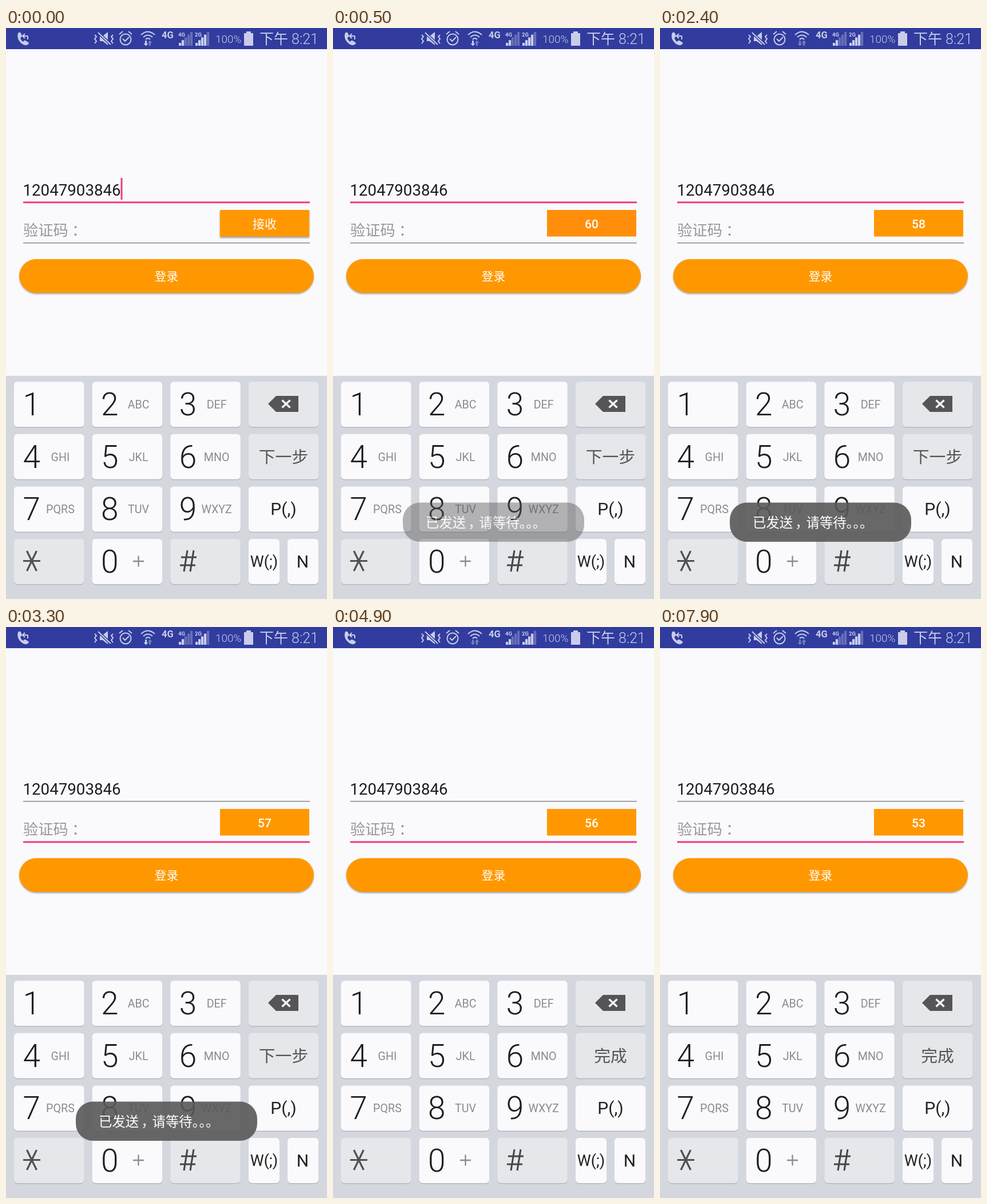
An HTML page for the animation above (8 s loop, 561 px wide and 998 px high).

```html
<!DOCTYPE html>
<html lang="zh-CN">
<head>
<meta charset="utf-8">
<title>登录</title>
<style>
  html, body { margin: 0; width: 100%; height: 100%; overflow: hidden; background: #faf9fc; }
  svg { display: block; width: 100%; height: 100%; font-family: Roboto, "Noto Sans CJK SC", "Noto Sans CJK", sans-serif; }
  .mid { text-anchor: middle; }
  .digit { font-size: 55px; font-weight: 300; fill: #1e1e20; }
  .sub { font-size: 19.7px; fill: #8b8b8f; text-anchor: middle; }
  .label { font-size: 30px; fill: #222; text-anchor: middle; }
  .line { fill: none; stroke: #c9cdea; stroke-width: 2; }
</style>
</head>
<body>
<svg viewBox="0 0 561 998" xmlns="http://www.w3.org/2000/svg">
  <defs>
    <filter id="soft" x="-10%" y="-30%" width="120%" height="170%"><feGaussianBlur stdDeviation="1.5"/></filter>
  </defs>
  <rect width="561" height="998" fill="#faf9fc"/>

  <g id="status" fill="#c9cdea">
    <rect width="561" height="37" fill="#313c9e"/>
    <path d="M21 9 q3 -3 5 0 l2 5 q0 2 -3 3 q1 5 5 7 q2 -3 4 -2 l5 3 q2 2 -1 4 q-5 3 -11 -2 q-9 -8 -6 -18z"/>
    <path class="line" d="M38 14 H30 M33 10 L29 14 L33 18 M38 14 V20"/>
    <path class="line" d="M155 12 l3 3 -3 4 3 4 -3 4 M187 12 l-3 3 3 4 -3 4 3 4" stroke-width="1.6"/>
    <path d="M164 14 h5 l9 -7 v23 l-9 -7 h-5z"/>
    <path d="M161 8 L183 29" stroke="#313c9e" stroke-width="5"/>
    <path class="line" d="M161 8 L183 29"/>
    <circle class="line" cx="209" cy="20" r="9.5"/>
    <path class="line" d="M204 19 l4 4 7 -7 M198 11 l6 -5 M220 11 l-6 -5" stroke-width="2.4"/>
    <path class="line" d="M236 12 Q248 1 260 12 M240 16 Q248 9 256 16 M244 20 Q248 16 252 20" stroke-width="2.6"/>
    <path id="down" d="M243 22 h3 v5 h2.500 l-4 4.500 -4 -4.500 h2.500z"/>
    <path d="M250 31 h3 v-5 h2.500 l-4 -4.500 -4 4.500 h2.500z" opacity=".45"/>
    <text x="272" y="18" font-size="16.500" font-weight="700">4G</text>
    <text x="301" y="15" font-size="9.500" font-weight="700">4G</text>
    <text x="330" y="15" font-size="9.500" font-weight="700">2G</text>
    <g id="bars"></g>
    <text x="366" y="26" font-size="19" font-weight="300">100%</text>
    <path d="M420 6 h8 v3 h4 v22 h-16 v-22 h4z"/>
    <text x="443" y="28" font-size="25" font-weight="300">下午 8:21</text>
  </g>

  <text x="29.500" y="293" font-size="27.700" fill="#1c1c1e">12047903846</text>
  <rect id="phoneLine" x="30" width="501"/>
  <rect id="phoneCaret" x="200.500" y="262" width="3" height="38" fill="#f43a7c"/>
  <text x="30" y="363" font-size="26.300" fill="#98979b">验证码<tspan x="115">：</tspan></text>
  <rect id="codeLine" x="30" width="501"/>
  <rect id="codeCaret" x="29.800" y="333" width="3" height="38" fill="#f43a7c"/>

  <rect id="sendShadow" x="374" y="320" width="156" height="47" fill="#000" opacity=".35" filter="url(#soft)"/>
  <rect id="send" x="374" y="318" width="156" height="46.500"/>
  <text id="sendText" class="mid" x="452" y="349.500" font-size="21" font-weight="500" fill="#fff"></text>

  <rect x="23.500" y="406" width="514" height="59" rx="29.500" fill="#000" opacity=".35" filter="url(#soft)"/>
  <rect x="23" y="404" width="515" height="59" rx="29.500" fill="#ff9800"/>
  <text class="mid" x="280.500" y="441.500" font-size="20.700" fill="#fff">登录</text>

  <rect y="608" width="561" height="390" fill="#d4d7dd"/>
  <g id="keys"></g>
  <path d="M458 657 L472 643 H511 V671 H472Z" fill="#555557"/>
  <path d="M482.500 650.500 l14 13 m0 -13 l-14 13" stroke="#f4f4f6" stroke-width="3.500"/>
  <text id="action" class="mid" x="485" y="760" font-size="28.800" fill="#555557"></text>
  <text class="label" x="485" y="851">P(,)</text>
  <text class="label" x="451" y="942" style="font-size:27px">W(;)</text>
  <text class="label" x="518.500" y="943">N</text>
  <path d="M222 932 h19 m-9.500 -9.500 v19" stroke="#8b8b8f" stroke-width="2.300"/>
  <path d="M30 931.500 h30 M36.500 914 l17 35 m0 -35 l-17 35" stroke="#505052" stroke-width="3.200"/>
  <path d="M317 913 l-6 37 m17 -37 l-6 37 M306 925 h27 M304 939 h27" stroke="#454547" stroke-width="3"/>

  <g id="toast">
    <rect x="122" y="829.500" width="317" height="68.500" rx="30" fill="#595959" opacity=".9"/>
    <text x="162" y="873" font-size="23.400" fill="#fff">已发送<tspan dx="4">，</tspan><tspan dx="-4">请等待。。。</tspan></text>
  </g>
</svg>
<script>
const LOOP = 8000, FOCUS = 3300, TICK = 100;
const PINK = '#f43a7c', GREY = '#77777a';
const $ = id => document.getElementById(id);
const set = (el, attrs) => { for (const k in attrs) el.setAttribute(k, attrs[k]); };
const show = (id, on) => $(id).setAttribute('visibility', on ? 'visible' : 'hidden');
const clamp = v => Math.max(0, Math.min(1, v));

function add(parent, tag, attrs, text) {
  const el = document.createElementNS('http://www.w3.org/2000/svg', tag);
  set(el, attrs);
  if (text) el.textContent = text;
  parent.appendChild(el);
}

function key(x, y, width, special) {
  const box = { x, width, height: 79, rx: 6 };
  add($('keys'), 'rect', { ...box, y: y + 1.5, fill: '#b5b8bf' });
  add($('keys'), 'rect', { ...box, y, fill: special ? '#e5e7eb' : '#faf9fc' });
}

function buildKeys() {
  const letters = ['', 'ABC', 'DEF', 'GHI', 'JKL', 'MNO', 'PQRS', 'TUV', 'WXYZ'];
  for (let row = 0; row < 4; row++) {
    const y = 618.2 + row * 91.6;
    for (let col = 0; col < 3; col++) {
      const x = 14 + col * 136.6, n = row * 3 + col;
      key(x, y, 122.6, row === 3 && col !== 1);
      if (row === 3 && col !== 1) continue;
      add($('keys'), 'text', { class: 'digit', x: x + 15.5, y: y + 59 }, row === 3 ? '0' : String(n + 1));
      if (letters[n]) add($('keys'), 'text', { class: 'sub', x: x + 81, y: y + 46.8 }, letters[n]);
    }
    if (row < 3) key(424, y, 122.5, row < 2);
    else { key(424, y, 54, false); key(492, y, 54, false); }
  }
}

function buildBars() {
  [[302, 2], [331, 4]].forEach(([x, lit]) => {
    for (let i = 0; i < 5; i++) {
      const height = 5 + i * 4.8;
      add($('bars'), 'rect', { x: x + i * 5, y: 31 - height, width: 4.2, height, opacity: i < lit ? 1 : .35 });
    }
  });
}

function underline(id, y, focused) {
  set($(id), focused ? { y: y - .7, height: 3, fill: PINK } : { y, height: 1.3, fill: GREY });
}

function render(t) {
  const onCode = t >= FOCUS;
  underline('phoneLine', 304, !onCode);
  underline('codeLine', 375, onCode);
  show('phoneCaret', !onCode && Math.floor((t + 100) / 500) % 2 === 0);
  show('codeCaret', onCode && Math.floor((t + 100) / 500) % 2 === 1);

  const counting = t >= TICK;
  $('sendText').textContent = counting ? 60 - Math.floor((t - TICK) / 1000) : '接收';
  show('sendShadow', !counting);
  set($('send'), { fill: counting && t < 600 ? '#ff8f0a' : '#ff9800' });

  $('action').textContent = t < 3700 ? '下一步' : '完成';
  set($('toast'), { opacity: Math.min(clamp((t - 300) / 400), clamp((3800 - t) / 400)) });
  set($('down'), { opacity: t < 1100 || (t >= FOCUS && t < 4100) ? 1 : .45 });
}

buildKeys();
buildBars();
const start = performance.now();
function frame() {
  render((performance.now() - start) % LOOP);
  requestAnimationFrame(frame);
}
frame();
</script>
</body>
</html>
```
